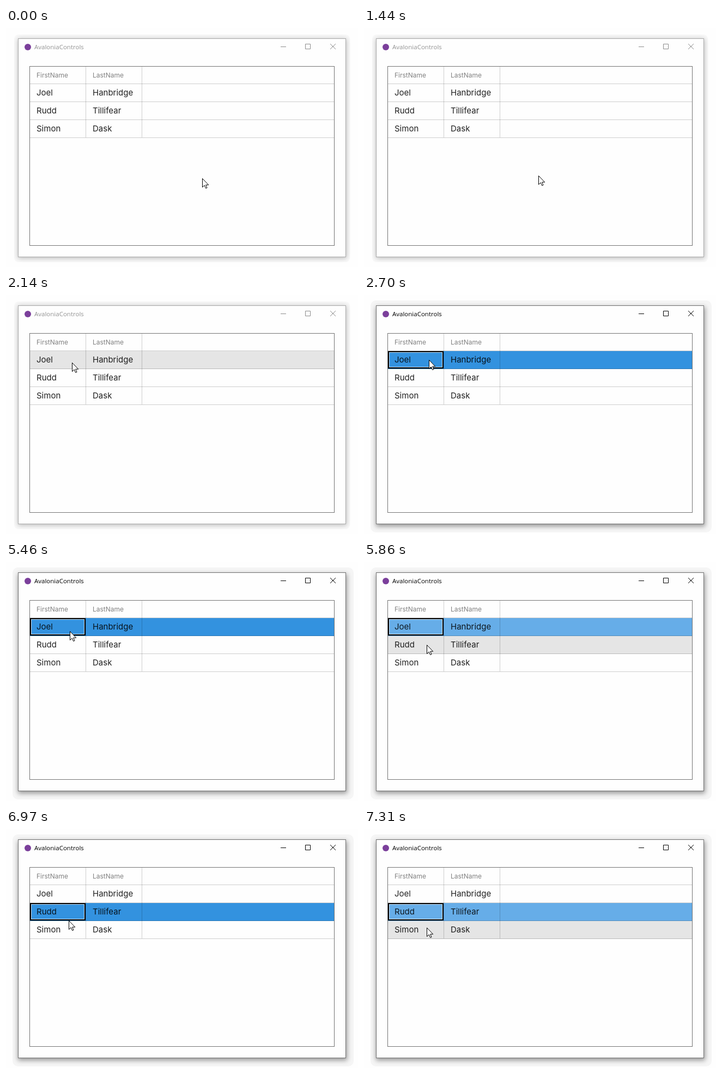
Write an HTML page that moves like this. It is 646 px wide and 439 px high and loops after 8 s.

```html
<!DOCTYPE html>
<html lang="en">
<head>
<meta charset="utf-8">
<title>Data grid selection</title>
<style>
  html, body { margin: 0; width: 100%; height: 100%; overflow: hidden; background: #fefefe; }
  svg { display: block; width: 646px; height: 439px; }
  text { white-space: pre; }
  .title { font: 11.5px "Open Sans", "Noto Sans", sans-serif; }
  .head { font: 12px Inter, sans-serif; fill: #808080; }
  .cell { font: 15px Inter, sans-serif; fill: #000; fill-opacity: .87; }
</style>
</head>
<body>
<svg viewBox="0 0 646 439" xmlns="http://www.w3.org/2000/svg">
  <defs>
    <filter id="soft" x="-10%" y="-10%" width="120%" height="120%">
      <feGaussianBlur stdDeviation="4.5"/>
    </filter>
  </defs>
  <rect width="646" height="439" fill="#fefefe"/>
  <g id="idleShadow">
    <rect x="15" y="12" width="616" height="418" rx="8" fill="#f8f8f8"/>
    <rect x="22" y="20" width="603" height="403" fill="#000" opacity=".24" filter="url(#soft)"/>
  </g>
  <g id="activeShadow">
    <rect x="12" y="10" width="626" height="426" rx="10" fill="#f5f5f5"/>
    <rect x="22" y="22" width="604" height="403" fill="#000" opacity=".38" filter="url(#soft)"/>
  </g>
  <rect id="frame" x="22.5" y="19.5" width="601" height="401" fill="#fefefe"/>

  <circle cx="40" cy="35" r="6" fill="#7b3f9b"/>
  <text id="title" class="title" x="52" y="39">AvaloniaControls</text>
  <g id="buttons" fill="none">
    <path d="M504 34.5H514M549.5 29.5H558.5V38.5H549.5Z"/>
    <path d="M595 29L605 39M605 29L595 39"/>
  </g>

  <g id="rows"></g>
  <path d="M44 102.5H602M44 135.5H602M44 168.5H602M44 201.5H602M146.5 71V201M249.5 71V201"
        stroke="#000" stroke-opacity=".19" fill="none"/>
  <g id="focus" fill="none">
    <rect x="45" y="104" width="100" height="30" stroke="#000" stroke-width="2"/>
    <rect x="46.5" y="105.5" width="97" height="27" stroke="#fff" stroke-opacity=".7"/>
  </g>
  <g id="labels"></g>
  <rect x="43.5" y="70.5" width="559" height="329" fill="none" stroke="#747474"/>
  <path id="cursor" d="M.5 .5V16.5L4.2 13L6.7 18.5L9 17.5L6.7 12.2H11.7Z"
        fill="#fff" stroke="#000" stroke-linejoin="round"/>
</svg>
<script>
const LOOP = 8000, TOP = 103, ROW = 33;
const people = [["Joel", "Hanbridge"], ["Rudd", "Tillifear"], ["Simon", "Dask"]];
const $ = id => document.getElementById(id);

function add(parent, tag, attrs, text = "") {
  const el = document.createElementNS("http://www.w3.org/2000/svg", tag);
  for (const key in attrs) el.setAttribute(key, attrs[key]);
  el.textContent = text;
  return parent.appendChild(el);
}

function addLabels(cls, y, texts) {
  texts.forEach((s, i) => add($("labels"), "text", { class: cls, x: 56 + i * 103, y }, s));
}

addLabels("head", 91, ["FirstName", "LastName"]);
const rows = people.map((person, i) => {
  addLabels("cell", 124 + i * ROW, person);
  return add($("rows"), "rect", { x: 44, y: TOP + i * ROW, width: 558, height: ROW });
});

const smooth = u => u * u * (3 - 2 * u);
const easeOut = p => 1 - (1 - p) ** 2;

// Pointer moves: sampled in discrete steps, each axis with its own easing
const moves = [
  { start: 1380, end: 2140, steps: 14, from: [360, 276], to: [121, 124],
    ease: [p => smooth(p ** 0.7), p => smooth(p ** 1.18)] },
  { start: 2200, end: 2200, steps: 1, from: [121, 124], to: [119, 119], ease: [easeOut, easeOut] },
  { start: 5460, end: 5860, steps: 7, from: [119, 119], to: [115, 152], ease: [easeOut, easeOut] },
  { start: 6850, end: 7310, steps: 9, from: [115, 152], to: [115, 181], ease: [easeOut, easeOut] }
];

function pointAt(move, step) {
  const p = Math.max(0, step) / move.steps;
  return move.from.map((a, i) => Math.floor(a + (move.to[i] - a) * move.ease[i](p)));
}

// The hover highlight trails the pointer by one step
function pointer(t) {
  const move = moves.filter(m => t >= m.start).pop();
  if (!move) return { tip: moves[0].from, hoverY: moves[0].from[1] };
  if (t >= move.end) {
    const last = move.steps;
    return { tip: move.to, hoverY: pointAt(move, last - 1)[1] };
  }
  const step = 1 + Math.floor((t - move.start) / (move.end - move.start) * (move.steps - 1));
  return { tip: pointAt(move, step), hoverY: pointAt(move, step - 1)[1] };
}

function rowFill(selected, hovered) {
  if (selected) return hovered ? "#3392df" : "#66ade8";
  return hovered ? "#e5e5e5" : "none";
}

function render(t) {
  const active = t >= 2700;
  const selected = t >= 6170 ? 1 : active ? 0 : -1;
  const { tip, hoverY } = pointer(t);
  const hovered = Math.floor((hoverY - TOP) / ROW);

  rows.forEach((row, i) => row.setAttribute("fill", rowFill(i === selected, i === hovered)));
  $("focus").setAttribute("visibility", active ? "visible" : "hidden");
  $("focus").setAttribute("transform", `translate(0 ${Math.max(0, selected) * ROW})`);
  $("activeShadow").setAttribute("visibility", active ? "visible" : "hidden");
  $("idleShadow").setAttribute("visibility", active ? "hidden" : "visible");
  $("frame").setAttribute("stroke", active ? "#707070" : "#a9a9a9");
  $("title").setAttribute("fill", active ? "#000" : "#939393");
  $("buttons").setAttribute("stroke", active ? "#000" : "#8c8c8c");
  $("cursor").setAttribute("transform", `translate(${tip[0]} ${tip[1]})`);
}

const began = performance.now();
function tick() {
  render((performance.now() - began) % LOOP);
  requestAnimationFrame(tick);
}
tick();
</script>
</body>
</html>
```
